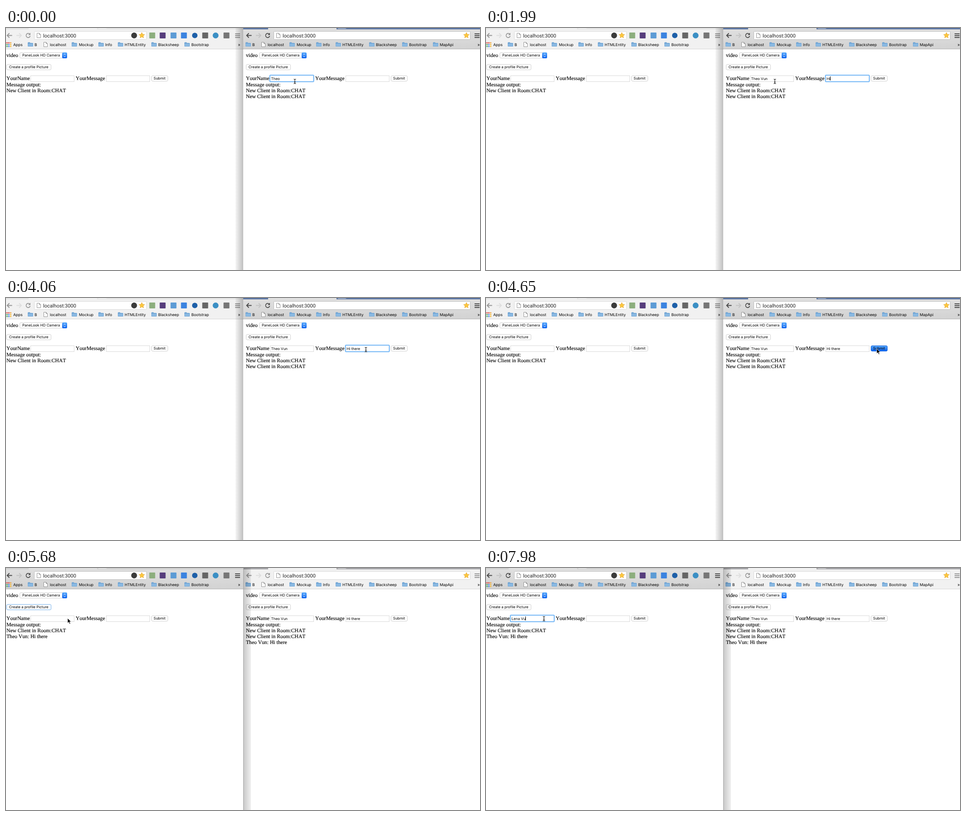
An HTML page that plays this animation: 1047x535 px, repeating every 8 s.

```html
<!DOCTYPE html>
<html lang="en">
<head>
<meta charset="utf-8">
<title>Chat in two browser windows</title>
<style>
  html, body { margin: 0; width: 100%; height: 100%; overflow: hidden; background: #fff; }
  svg { display: block; }
  text { white-space: pre; text-rendering: geometricPrecision; }
  .page { font: 11.63px "Liberation Serif", "Times New Roman", serif; font-kerning: none; stroke: #000; stroke-width: .15px; }
  .ui { font: 8px Inter, sans-serif; }
  .mark { font: 8.45px Inter, sans-serif; }
  .url { font: 11.1px Roboto, sans-serif; fill: #222; }
</style>
</head>
<body>
<svg width="1047" height="535" viewBox="0 0 1047 535">
  <defs>
    <linearGradient id="bar" x2="0" y2="1"><stop stop-color="#e0e0e0"/><stop offset="1" stop-color="#d2d2d2"/></linearGradient>
    <linearGradient id="leftShade"><stop stop-color="#000" stop-opacity=".04"/><stop offset="1" stop-color="#000" stop-opacity=".25"/></linearGradient>
    <linearGradient id="rightShade"><stop stop-color="#000" stop-opacity=".22"/><stop offset="1" stop-color="#000" stop-opacity=".06"/></linearGradient>
    <linearGradient id="blue" x2="0" y2="1"><stop stop-color="#58a9fb"/><stop offset="1" stop-color="#0a62f0"/></linearGradient>
    <clipPath id="leftClip"><rect width="524" height="535"/></clipPath>
    <clipPath id="rightClip"><rect x="524" width="523" height="535"/></clipPath>
  </defs>
  <g id="scene"></g>
</svg>
<script>
const LOOP = 8000;
const scene = document.getElementById('scene');
const ruler = document.createElement('canvas').getContext('2d');

const rect = (x, y, w, h, fill, extra = '') =>
  `<rect x="${x}" y="${y}" width="${w}" height="${h}" fill="${fill}" ${extra}/>`;
const box = (x, y, w, h, fill, stroke, r = 0) =>
  rect(x + .5, y + .5, w - 1, h - 1, fill, `stroke="${stroke}" rx="${r}"`);
const label = (x, y, str, kind) => `<text x="${x}" y="${y}" class="${kind}">${str}</text>`;
const line = (d, color, w = 1.5) => `<path d="${d}" fill="none" stroke="${color}" stroke-width="${w}"/>`;
const dot = (x, y, r, fill) => `<circle cx="${x}" cy="${y}" r="${r}" fill="${fill}"/>`;

// Steps are [time, value...]; the latest one reached holds.
const current = (t, steps) => steps.filter(s => s[0] <= t).pop().slice(1);
const typed = (t, str, start, times) => str.slice(0, start + times.filter(k => k <= t).length);

const folder = x =>
  `<path d="M${x} 33q0-1.500 1.500-1.500h3l1.500 1.500h4.500q1.500 0 1.500 1.500v5q0 1.500-1.500 1.500h-9q-1.500 0-1.500-1.500z" fill="#6fa3d3"/>` +
  rect(x + .5, 34.5, 11, 6, '#8ab9e2', 'rx="1"');
const sheet = (x, y) =>
  `<path transform="translate(${x} ${y})" d="M.5.5h5l3 3v7h-8zM5.500.500v3h3" fill="#fff" stroke="#888" stroke-width=".9"/>`;
const star = (x, y) => {
  const points = Array.from({ length: 10 }, (_, i) => {
    const r = i % 2 ? 3 : 6.6, a = (i / 5 - .5) * Math.PI;
    return `${x + r * Math.cos(a)},${y + r * Math.sin(a)}`;
  });
  return `<polygon points="${points}" fill="#fdc83b" stroke="#e0a02b" stroke-width=".8"/>`;
};

function apps() {
  const colors = ['#e2453c', '#e2453c', '#f0a03a', '#48a860', '#4583e8', '#f0b83a', '#48a860', '#4583e8', '#f0b83a'];
  return colors.map((c, i) => rect(1 + i % 3 * 4, 31.5 + (i / 3 | 0) * 4, 2.7, 2.7, c)).join('') + label(16, 40, 'Apps', 'mark');
}

function bookmarks(dx, last) {
  const items = [[48, 63, 'B'], [145, 161, 'Mockup'], [204, 219, 'Info'], [247, 262, 'HTMLEntity'],
    [321, 336, 'Blacksheep'], [394, 409.5, 'Bootstrap']];
  if (last) items.push([462, 477, last]);
  return items.map(([icon, x, str]) => folder(icon + dx) + label(x + dx, 40, str, 'mark')).join('') +
    sheet(83 + dx, 31) + label(97 + dx, 40, 'localhost', 'mark');
}

function extensions() {
  const square = (x, c) => rect(x - 6.5, 10, 13, 13, c, 'rx="1"');
  return dot(283, 16.5, 6.5, '#3c3c3c') + star(300, 16.5) + square(323, '#8cae7d') + square(346, '#563d7c') +
    square(370, '#5c9bd5') + square(393, '#3b83e0') + dot(417, 16.5, 6, '#1d5fa8') + square(440, '#666') +
    dot(463, 16.5, 6.5, '#3b8fc4') + square(487, '#777');
}

function chrome(x, w, active, strip) {
  const ink = active ? '#4a4a4a' : '#969696';
  const left = x === 0;
  const urlWidth = left ? 249 : 435;
  const menu = x + w - (left ? 18 : 12);
  const origin = left ? 0 : 529;
  // dir is 1 for back, -1 for forward
  const arrow = (ax, dir, c) =>
    line(`M${ax + 5.5 * dir} 16.500h${-10 * dir}M${ax - .5 * dir} 11.500l${-5 * dir} 5l${5 * dir} 5`, c, 1.8);
  return rect(x, 0, w, 47, active ? 'url(#bar)' : '#f1f1f1') +
    rect(x, 0, origin + 50 - x, 3, strip) + rect(origin + 201, 0, x + w - origin - 201, 3, strip) +
    `<path d="M${origin + 203} 0h17q2 0 3 2h-17q-2 0-3-2z" fill="#fff" fill-opacity=".4"/>` +
    rect(x, 46, w, 1, active ? '#b4b4b4' : '#d4d4d4') +
    arrow(origin + 8, 1, ink) + arrow(origin + 28.5, -1, active ? '#c2c2c2' : '#dedede') +
    line(`M${origin + 52.5} 13.500a4.600 4.600 0 1 0 1 4`, ink, 1.7) +
    `<path d="M${origin + 54} 10.500v5h-5z" fill="${ink}"/>` +
    box(origin + 62, 7, urlWidth, 19, '#fff', active ? '#bcbcbc' : '#d8d8d8', 2) +
    sheet(origin + 68, 11) + label(origin + 82, 20.5, 'localhost:3000', 'url') +
    [12, 16, 20].map(y => rect(menu, y, 11, 2, ink)).join('') +
    (left ? apps() + bookmarks(0) + extensions() : bookmarks(481, 'MapApi') + star(1017, 16.5)) +
    label(left ? 512.5 : 1041.5, 39.5, '»', 'mark');
}

function field(x, value, focused, caret) {
  const end = x + 2.5 + ruler.measureText(value).width;
  return (focused
    ? rect(x, 104.5, 96.5, 14, '#fff', 'stroke="#b4d8fa" stroke-width="3" rx="1.500"') +
      rect(x, 104.5, 96.5, 14, '#fff', 'stroke="#68b0f4" stroke-width="1.600" rx="1"')
    : box(x, 105, 97, 14, '#fff', '#d9d9d9')) +
    label(x + 2.5, 114.6, value, 'ui') +
    (focused && caret ? rect(Math.round(end), 107, 1, 9, '#000') : '');
}

const buttonLooks = {
  plain: ['#fff', '#d0d0d0'],
  focus: ['#fff', '#74b0ea'],
  pressed: ['url(#blue)', '#1a66dd']
};
const button = (x, y, w, str, pad, look) =>
  box(x, y, w, 13, ...buttonLooks[look || 'plain'], 2.5) + label(x + pad, y + 9.2, str, 'ui');

function form(dx, side, s, name, message, log) {
  const at = id => s.focus === side + id;
  return label(dx + 1, 63.5, 'video', 'page') +
    box(dx + 30, 54, 105, 13, '#fff', '#d0d0d0', 2.5) + label(dx + 36, 63.2, 'PaneLook HD Camera', 'ui') +
    rect(dx + 124, 54, 11, 13, 'url(#blue)', 'rx="2.500"') +
    line(`M${dx + 127.5} 59.300l2-2.300 2 2.300M${dx + 127.5} 61.700l2 2.300 2-2.300`, '#fff', 1) +
    button(dx + 1, 80, 99, 'Create a profile Picture', 5.7, at('Picture') && 'focus') +
    label(dx + 1, 115, 'YourName', 'page') + field(dx + 54, name, at('Name'), s.caret) +
    label(dx + 154, 115, 'YourMessage', 'page') + field(dx + 221, message, at('Message'), s.caret) +
    button(dx + 321, 105, 37, 'Submit', 5, at('Submit') && 'pressed') +
    ['Message output:', ...log].map((str, i) => label(dx + 1, 128.7 + 13.2 * i, str, 'page')).join('');
}

function cursor(kind, x, y) {
  if (kind === 'arrow')
    return `<path transform="translate(${x} ${y})" d="M0 0v11l2.600-2.400 1.900 4.200 1.900-.8-1.900-4.100h3.500z" stroke="#fff" stroke-width=".8"/>`;
  return line(`M${x - 2.5} ${y - 5}q2.500 0 2.500 1.500v7q0 1.500-2.500 1.500M${x + 2.5} ${y - 5}q-2.500 0-2.500 1.500v7q0 1.500 2.500 1.500M${x - 1.5} ${y + 1.5}h3`, '#111', 1.1);
}

const focusSteps = [[0, 'rightName'], [1100, 'rightMessage'], [4650, 'rightSubmit'], [4800, ''],
  [5680, 'leftPicture'], [6130, 'leftName']];
const caretSteps = [[0, false], [450, true], [1540, false], [1840, true], [2430, false], [2580, true],
  [3770, false], [6330, true], [6780, false], [7080, true]];
const cursorSteps = [[0, 'beam', 638, 118], [3920, 'beam', 722, 116], [4060, 'beam', 795, 114],
  [4210, 'beam', 832, 113], [4360, 'arrow', 856, 112], [4500, 'arrow', 863, 112], [4940, 'arrow', 780, 112],
  [5090, 'arrow', 570, 114], [5240, 'arrow', 340, 114], [5380, 'arrow', 190, 112], [5530, 'arrow', 136, 111],
  [6130, 'beam', 128, 112]];

function draw(t) {
  ruler.font = '8px Inter, sans-serif';
  const s = { focus: current(t, focusSteps)[0], caret: current(t, caretSteps)[0] };
  const leftActive = t >= 5680;
  const joined = 'New Client in Room:CHAT';
  const sent = t >= 4800 ? ['Theo Vun: Hi there'] : [];
  const rightName = typed(t, 'Theo Vun', 4, [450, 600, 750, 900]);
  const message = typed(t, 'Hi there', 0, [1840, 1990, 2580, 3030, 3180, 3320, 3320, 3470]);
  const leftName = typed(t, 'Lena Vu', 0, [7080, 7380, 7530, 7680, 7830, 7830, 7980]);
  const shade = leftActive
    ? rect(524, 0, 17, 535, 'url(#rightShade)') + rect(524, 0, 1, 535, '#a4a4a4')
    : rect(507, 0, 17, 535, 'url(#leftShade)') + (sent.length ? rect(502, 106, 5, 63, '#f8f8f8') : '');
  const leftStrip = leftActive ? '#d0d0d0' : '#e4e4e4';
  const rightStrip = leftActive ? '#a6a6aa' : '#5b75a2';
  return `<g clip-path="url(#leftClip)">${chrome(0, 524, leftActive, leftStrip)}${form(0, 'left', s, leftName, '', [joined, ...sent])}</g>` +
    `<g clip-path="url(#rightClip)">${chrome(524, 523, !leftActive, rightStrip)}${form(529, 'right', s, rightName, message, [joined, joined, ...sent])}</g>` +
    shade + cursor(...current(t, cursorSteps));
}

let shown = '';
function tick() {
  const markup = draw(performance.now() % LOOP);
  if (markup !== shown) scene.innerHTML = shown = markup;
  requestAnimationFrame(tick);
}
tick();
</script>
</body>
</html>
```
